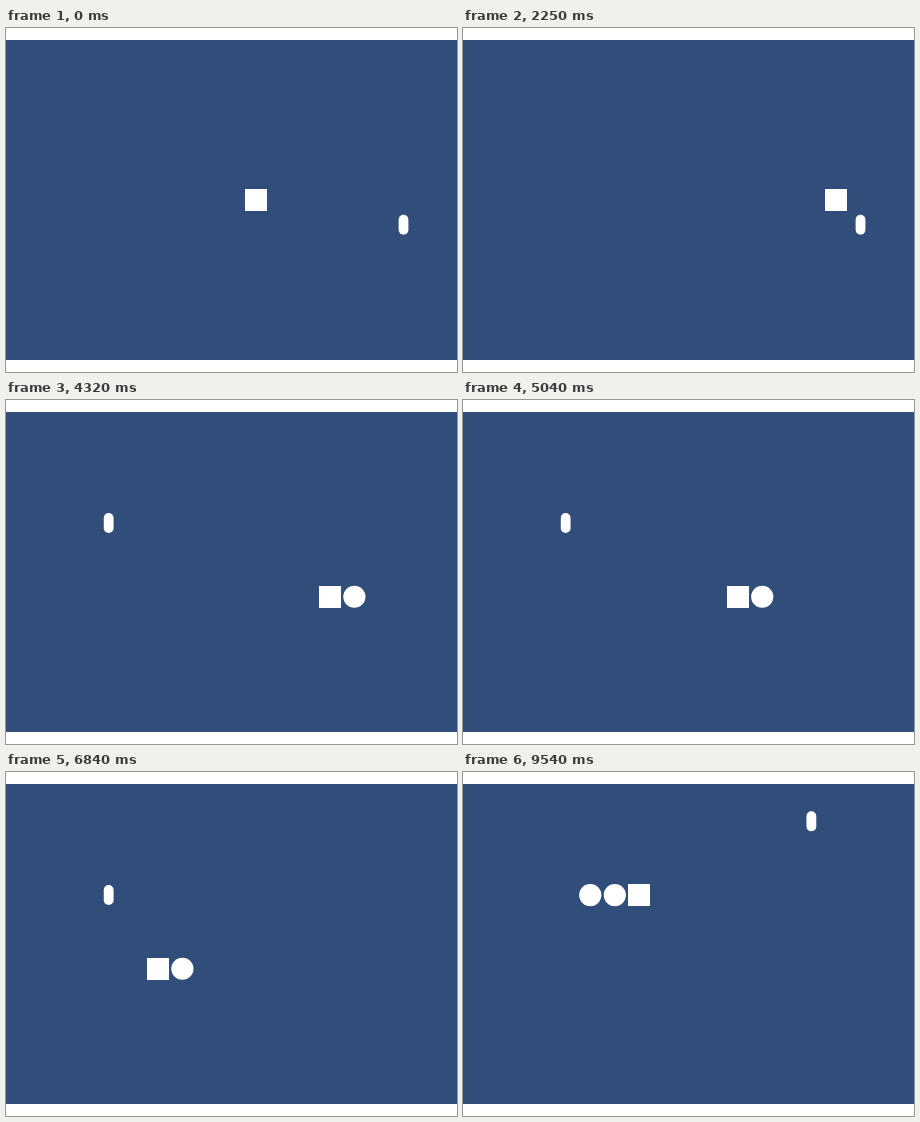
An HTML page for the animation above (9820 ms loop, 451 px wide and 344 px high).

```html
<!DOCTYPE html>
<html lang="en">
<head>
<meta charset="utf-8">
<title>Snake</title>
<style>
  html, body { margin: 0; width: 100%; height: 100%; overflow: hidden; background: #fff; }
  svg { display: block; width: 100%; height: 100%; }
</style>
</head>
<body>
<svg viewBox="0 0 451 344">
  <rect y="12" width="451" height="320" fill="#304e79"/>
  <g fill="#fff">
    <rect id="food" x="-4.9" y="-10" width="9.8" height="20" rx="4.9"/>
    <circle class="tail" r="11.1"/>
    <circle class="tail" r="11.1"/>
    <rect id="head" x="-11.1" y="-11.1" width="22.2" height="22.2" shape-rendering="crispEdges"/>
  </g>
</svg>
<script>
const LOOP = 9820, CELL = 24.57;
const DIRS = { R: [1, 0], L: [-1, 0], U: [0, -1], D: [0, 1] };
const moves = "R".repeat(6) + "D" + "L".repeat(11) + "UUU" + "L" + "RRR";

// Cells visited by the head, relative to its start
const path = [[0, 0]];
for (const m of moves) {
  const [x, y] = path[path.length - 1], [dx, dy] = DIRS[m];
  path.push([x + dx, y + dy]);
}

const head = document.getElementById("head");
const food = document.getElementById("food");
const tail = [...document.querySelectorAll(".tail")];

function place(el, [col, row]) {
  el.setAttribute("transform", `translate(${250.1 + col * CELL} ${172.2 + row * CELL})`);
}

// The snake speeds up after each meal
function stepAt(t) {
  if (t < 3600) return Math.min(7, Math.floor(t / 450));
  if (t < 9000) return 8 + Math.floor((t - 3600) / 360);
  return Math.min(moves.length, 23 + Math.floor((t - 9000) / 270));
}

function foodAt(t) {
  return t < 3180 ? [6, 1] : t < 8670 ? [-6, -2] : [4, -5];
}

function draw(t) {
  const step = stepAt(t);
  const length = step < 8 ? 0 : step < 23 ? 1 : 2;
  place(head, path[step]);
  place(food, foodAt(t));
  tail.forEach((part, i) => {
    const shown = i < length;
    part.style.display = shown ? "" : "none";
    if (shown) place(part, path[step - 1 - i]);
  });
}

const start = performance.now();
function tick() {
  draw((performance.now() - start) % LOOP);
  requestAnimationFrame(tick);
}
tick();
</script>
</body>
</html>
```
